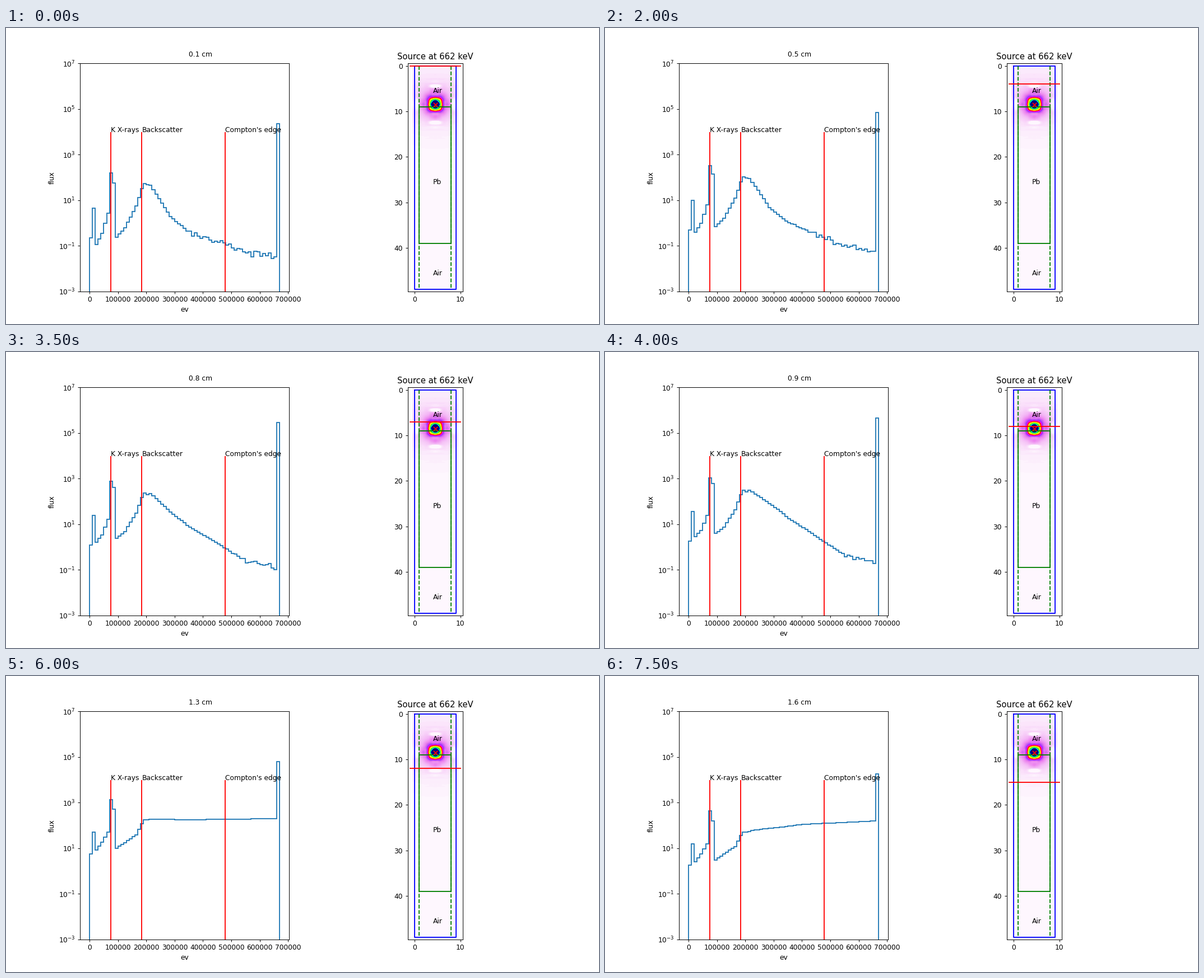
These frames come from a looping animation (1058 px wide and 529 px high, 8 s). A matplotlib script:

```python
import numpy as np
import matplotlib.pyplot as plt
from matplotlib.animation import FuncAnimation

plt.rcParams["font.family"] = "DejaVu Sans"

ROWS, COLS = 50, 10
STEPS, STEP_MS = 16, 500
SOURCE = (4.5, 8.5)
LEAD_TOP, LEAD_END = 9, 39
LINE_KEV, ELECTRON_KEV = 661.7, 511
BINS = np.arange(66)
EDGES = np.arange(68) * 1e4


def curve_through(points):
    return np.interp(BINS, list(points), list(points.values()))


# Key points {bin: log10 of flux}: first row in air, its rise towards the
# source, second row in lead, and its loss per row further down
AIR = curve_through({0: -.65, 1: .65, 2: -.94, 4: -.45, 6: .43, 7: 2.2, 8: 1.76,
                     9: -.62, 12: -.21, 16: .75, 18: 1.51, 19: 1.73, 21: 1.66,
                     28: .28, 34: -.35, 54: -1.24, 65: -1.4})
RISE = curve_through({1: .9, 2: 1.4, 7: .84, 9: 1.22, 18: .8, 20: .73, 28: 1.63,
                      33: 1.72, 40: 1.47, 54: .91, 65: .74})
LEAD = curve_through({0: 1.1, 1: 2.05, 2: 1.27, 4: 1.61, 6: 2.05, 7: 3.48, 8: 3.06,
                      9: 1.34, 16: 1.93, 18: 2.42, 19: 2.59, 22: 2.62, 32: 2.47,
                      40: 2.4, 65: 2.37})
LOSS = curve_through({18: .17, 20: .18, 28: .13, 40: .07, 65: .035})
EASE = curve_through({20: 1.4, 28: 2})


def spectrum(depth):
    r2 = (depth - SOURCE[1]) ** 2
    peak = 6.23 - np.log10(r2 + 3.5)
    if depth < LEAD_TOP:
        flux = AIR + RISE * (depth / 8) ** EASE
        noise = np.random.default_rng(depth + 3).normal(size=BINS.size)
        flux += .08 * noise * np.clip(.2 - flux, 0, 1) * (BINS > 30)
    else:
        flux = LEAD - LOSS * (depth - 10)
        peak -= .16 + .026 * (depth - LEAD_TOP)
    return 10 ** np.append(flux, peak)


def flux_map():
    y, x = np.mgrid[:ROWS, :COLS]
    r2 = (x - SOURCE[0]) ** 2 + (y - SOURCE[1]) ** 2
    shield = .08 * np.clip(y - LEAD_TOP, 0, None)
    return (.5 / r2) ** .85 * np.exp(-shield - .03 * np.sqrt(r2))


fig, (ax, plan) = plt.subplots(1, 2, figsize=(12, 6), dpi=529 / 6)

ax.set_yscale("log")
curve = ax.stairs(spectrum(0), EDGES, color="C0", lw=1.5)
backscatter = LINE_KEV / (1 + 2 * LINE_KEV / ELECTRON_KEV)
for kev, name in [(75, "K X-rays"), (backscatter, "Backscatter"),
                  (LINE_KEV - backscatter, "Compton's edge")]:
    ax.vlines(kev * 1e3, 1e-3, 1e4, color="red")
    ax.text(kev * 1e3, 1e4, name)
depth_text = ax.text(350e3, 2e7, "")
ax.set(xlim=(-33500, 703500), ylim=(1e-3, 1e7), xlabel="ev", ylabel="flux",
       xticks=range(0, 700001, 100000), yticks=[10.0 ** k for k in range(-3, 8, 2)])
ax.minorticks_off()

plan.imshow(flux_map(), cmap="gist_ncar_r", interpolation="sinc")
plan.plot([0, 9, 9, 0, 0], [0, 0, 49, 49, 0], color="blue")
for side in (1, 8):
    plan.plot([side, side], [0, 49], "--", color="green")
plan.plot([1, 8, 8, 1, 1], [LEAD_TOP, LEAD_TOP, LEAD_END, LEAD_END, LEAD_TOP],
          color="green")
plan.scatter(*SOURCE, marker="x", color="red", zorder=3)
for y, name in [(6, "Air"), (26, "Pb"), (46, "Air")]:
    plan.text(4, y, name)
scan, = plan.plot([-1, 10], [0, 0], color="red")
plan.set(xlim=(-1.55, 10.55), ylim=(49.5, -.5), xticks=[0, 10],
         yticks=range(0, 41, 10), title="Source at 662 keV")


def update(step):
    curve.set_data(values=spectrum(step))
    depth_text.set_text(f"{(step + 1) / 10:.1f} cm")
    scan.set_ydata([step, step])
    return curve, depth_text, scan


anim = FuncAnimation(fig, update, frames=STEPS, interval=STEP_MS,
                     init_func=lambda: update(0), repeat=True, repeat_delay=0)
plt.show()
```
